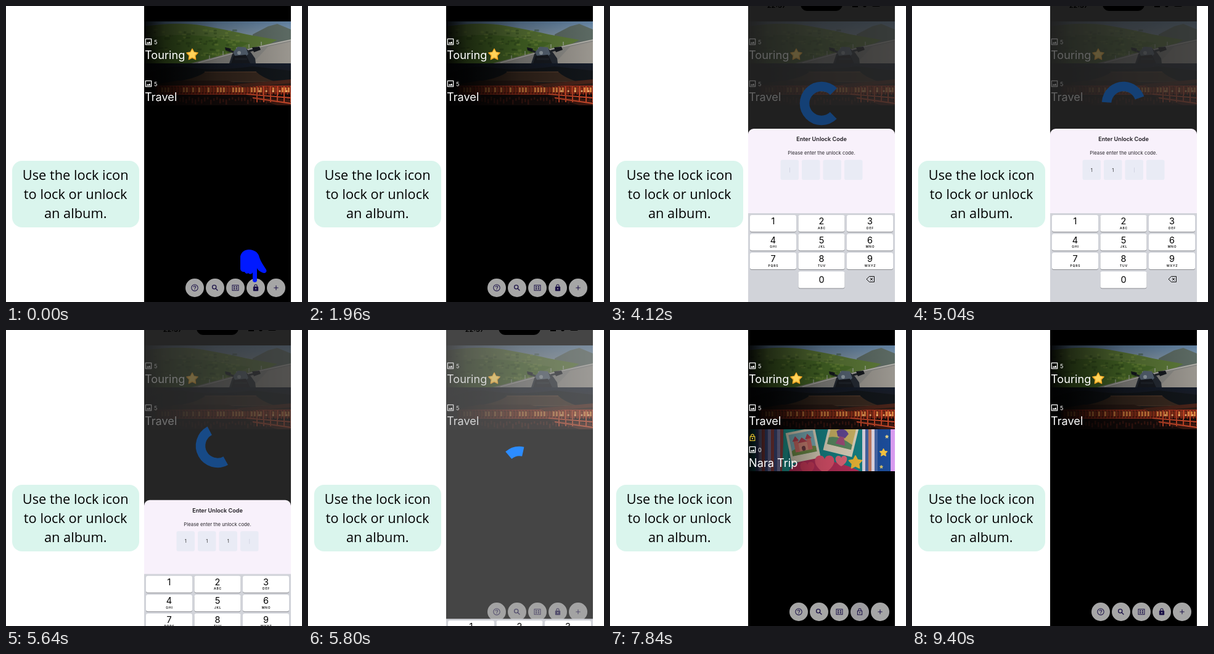
Animation of 480x480 px, one loop 9880 ms. Source, as an HTML page with a canvas:

```html
<!DOCTYPE html>
<html lang="en">
<head>
<meta charset="utf-8">
<title>Album lock</title>
<style>
html, body { margin: 0; width: 100%; height: 100%; overflow: hidden; background: #fff; }
canvas { display: block; width: 480px; height: 480px; }
</style>
</head>
<body>
<canvas id="stage" width="480" height="480"></canvas>
<script>
const ctx = document.getElementById('stage').getContext('2d');
const LOOP = 9880, STEP = 40;
const LEFT = 224, RIGHT = 462, MID = 343;
const KB_OPEN = 336, KB_SHUT = 495, SHEET = 137;
const INK = '#1b1147';

const clamp = v => Math.max(0, Math.min(1, v));
const part = (t, start, dur) => clamp((t - start) / dur);
const easeOut = p => 1 - (1 - p) * (1 - p);
const rad = deg => deg * Math.PI / 180;

function rect(x, y, w, h, color) {
  ctx.fillStyle = color;
  ctx.fillRect(x, y, w, h);
}

function round(x, y, w, h, r, color) {
  ctx.fillStyle = color;
  ctx.beginPath();
  ctx.roundRect(x, y, w, h, r);
  ctx.fill();
}

function disc(x, y, r, color) {
  ctx.fillStyle = color;
  ctx.beginPath();
  ctx.arc(x, y, r, 0, 7);
  ctx.fill();
}

function shape(d, color) {
  ctx.fillStyle = color;
  ctx.fill(new Path2D(d));
}

function line(d, color, width) {
  ctx.strokeStyle = color;
  ctx.lineWidth = width;
  ctx.stroke(new Path2D(d));
}

function text(s, x, y, font, color, align = 'left', gap = 0) {
  ctx.font = font;
  ctx.fillStyle = color;
  ctx.textAlign = align;
  ctx.letterSpacing = gap + 'px';
  ctx.fillText(s, x, y);
}

function at(x, y, scale, draw, turn = 0) {
  ctx.save();
  ctx.translate(x, y);
  ctx.rotate(turn);
  ctx.scale(scale, scale);
  draw();
  ctx.restore();
}

function star(x, y, r, color) {
  ctx.beginPath();
  for (let i = 0; i < 10; i++) {
    const a = rad(i * 36 - 90), d = i % 2 ? r * 0.52 : r;
    ctx.lineTo(x + d * Math.cos(a), y + d * Math.sin(a));
  }
  ctx.closePath();
  ctx.lineJoin = 'round';
  ctx.lineWidth = r * 0.16;
  ctx.fillStyle = ctx.strokeStyle = color;
  ctx.fill();
  ctx.stroke();
  ctx.lineJoin = 'miter';
}

function heart(x, y, s, color) {
  at(x, y, s, () => shape('M0 10C-14 2-12-9-5-9Q-1-9 0-5Q1-9 5-9C12-9 14 2 0 10Z', color));
}

// Seeded random numbers in 0..1
function seeded(seed) {
  return () => (seed = seed * 16807 % 2147483647) / 2147483647;
}

// Icons, drawn around the origin on a 24 unit grid
const icons = {
  help() {
    line('M10 0A10 10 0 1 1-10 0A10 10 0 1 1 10 0M-3.2-2.2C-3-7 3.4-6.6 3.2-2.4C3-.3 0 0 0 3M0 4.8V7', INK, 2);
  },
  search() {
    line('M3.5-2.5A6 6 0 1 1-8.5-2.5A6 6 0 1 1 3.5-2.5M1.8 1.8L8.5 8.5', INK, 2.5);
  },
  album() {
    line('M-9.5-8H9.5V8H-9.5Z', INK, 2);
    for (const x of [-5.5, 1.5]) for (const y of [-5, 1]) rect(x, y, 4, 4, INK);
  },
  lock() {
    line('M-4-3V-6A4 4 0 0 1 4-6V-3', INK, 2.2);
    round(-8, -4, 16, 14, 2, INK);
    disc(0, 3, 2, '#a6a6a6');
  },
  unlock(color = INK) {
    line('M-4-3V-6A4 4 0 0 1 4-6V-3M-7-3H7V9H-7Z', color, 2);
    disc(0, 3, 2, color);
  },
  add() {
    line('M-7 0H7M0-7V7', INK, 2);
  },
  image() {
    line('M-8-8H8V8H-8Z', '#fff', 2.2);
    shape('M-6 5L-2.8.7L-.5 3.5L2.8-.8L6.5 5Z', '#fff');
  }
};

function tourPhoto() {
  const rnd = seeded(7);
  const sky = ctx.createLinearGradient(0, 25, 0, 62);
  sky.addColorStop(0, '#5f7f9f');
  sky.addColorStop(1, '#97a5ad');
  rect(LEFT, 25, 238, 68, sky);
  shape('M400 46L425 33L440 29L462 38V66H400Z', '#5c6a63');
  shape('M224 33Q280 25 320 32T390 46L440 55L400 76L330 93H224Z', '#5d7a38');
  shape('M224 52Q285 42 345 52L395 60L325 93H224Z', '#4c7029');
  ctx.globalAlpha = 0.4;
  for (let i = 0; i < 90; i++) {
    const x = 228 + rnd() * 145;
    round(x, 37 + rnd() * 44, 3 + rnd() * 6, 2 + rnd() * 2, 1, i % 2 ? '#2a4519' : '#84a044');
  }
  ctx.globalAlpha = 1;
  shape('M300 93L372 74L428 61L462 54V93Z', '#8b8a86');
  shape('M425 66L462 58V93H400Z', '#9a968f');
  line('M312 92L390 71L462 55', '#c9c8c0', 1.2);
  line('M330 86V80M352 80V73M374 74V67M394 68V62M414 64V58', '#bdc1bb', 1);
  // motorcycle
  shape('M362 93L367 78L374 70L388 68L397 75L404 85L405 93Z', '#252b34');
  shape('M368 75L376 66L389 67L393 78L385 85L372 82Z', '#596777');
  shape('M369 81L389 79L396 93H365Z', '#171a20');
  line('M358 70L369 75M394 73L411 69M371 86H391', '#20252c', 3);
  shape('M355 67L365 69L363 74L356 72ZM399 67L411 66L413 71L402 75Z', '#15191f');
  disc(378, 76, 3, '#9aa6ae');
}

function shrinePhoto() {
  const rnd = seeded(21);
  const sky = ctx.createLinearGradient(0, 93, 0, 120);
  sky.addColorStop(0, '#151d2b');
  sky.addColorStop(1, '#1d1a1c');
  rect(LEFT, 93, 238, 68, sky);
  shape('M224 112Q262 94 300 100T400 98L462 105V130H224Z', '#12161a');
  shape('M271 123Q309 118 323 107L405 106Q415 116 437 123Z', '#3a2a20');
  line('M322 107H406M275 123H436', '#5a4031', 1.2);
  shape('M238 128L278 121H360L372 125L462 121V131H238Z', '#2e1d17');
  rect(242, 129, 220, 14, '#55190f');
  rect(242, 143, 220, 18, '#150c0b');
  for (let x = 246; x < 462; x += 5) {
    rect(x + 1, 132, 3, 8, rnd() > 0.6 ? '#d9823f' : '#7e2f18');
    rect(x, 129, 1, 15, '#b53a20');
    rect(x, 147 + rnd() * 5, 2.5, 3 + rnd() * 6, '#3d1812');
  }
  line('M242 130H462M242 143H400', '#a8351f', 1.5);
  shape('M374 127L462 119V125L384 132Z', '#4a241a');
  shape('M392 146L462 152V161H440Z', '#3b1811');
  line('M390 143L462 149M400 149L462 158', '#c9492b', 2);
  for (let x = 406; x < 462; x += 11) rect(x, 130, 2, 26, '#c04426');
  for (let x = 411; x < 462; x += 11) disc(x, 138, 1.5, '#f3b878');
}

function polaroid(x, y, turn, back, draw) {
  at(x, y, 1, () => {
    rect(-24, -24, 48, 50, '#e9dfc7');
    rect(-20, -20, 40, 35, back);
    draw();
  }, turn);
}

function artPhoto() {
  rect(LEFT, 161, 238, 68, '#17878a');
  for (let i = 0; i < 9; i++) rect(236 + i * 5, 161, 5, 68, ['#4b5a97', '#8d8bbb', '#a34a4a'][i % 3]);
  shape('M282 161H300Q282 194 291 229H279Z', '#20a299');
  shape('M290 229Q308 203 345 210T405 229Z', '#bf315d');
  polaroid(313, 186, -0.2, '#83b8c2', () => {
    shape('M-20 15V7Q-6 0 20 6V15Z', '#75954b');
    rect(-11, -5, 22, 15, '#e0907f');
    rect(-14, -9, 7, 19, '#d9706a');
    rect(7, -9, 7, 19, '#d9706a');
    shape('M-16-8L-10-16L-5-8ZM5-8L10-16L16-8ZM-8-4L0-12L8-4Z', '#c24556');
    round(-3, 2, 6, 8, 3, '#754047');
  });
  polaroid(375, 175, 0.24, '#d6bd6a', () => {
    shape('M-20 15V4Q-5-4 20 7V15Z', '#5f9267');
    shape('M-10-9Q0-20 10-9L6-1H-6Z', '#694b9c');
    shape('M-7 11L-3-2H4L9 11Z', '#aa5182');
  });
  heart(348, 217, 1.5, '#ea5672');
  heart(320, 224, 1.1, '#d83e60');
  heart(375, 212, 0.9, '#ef6c80');
  star(398, 215, 11, '#f4be38');
  for (let i = 0; i < 5; i++) rect(409 + i * 5, 161, 5, 68, ['#e4dcea', '#4667a8', '#c77f66'][i % 3]);
  rect(434, 161, 22, 68, '#1c4d9b');
  star(443.5, 199, 6.5, '#f6c642');
  star(449, 173, 3, '#e8d88a');
  star(440, 222, 3, '#d8c56c');
  rect(455, 161, 7, 68, '#d99cf0');
}

function row(y, title, count, photo, shade) {
  ctx.save();
  ctx.beginPath();
  ctx.rect(LEFT, y, 238, 68);
  ctx.clip();
  photo();
  const fade = ctx.createLinearGradient(LEFT, 0, RIGHT, 0);
  fade.addColorStop(0, 'rgba(0,0,0,0.95)');
  fade.addColorStop(0.14, `rgba(0,0,0,${shade})`);
  fade.addColorStop(0.5, `rgba(0,0,0,${shade * 0.4})`);
  fade.addColorStop(1, 'rgba(0,0,0,0)');
  rect(LEFT, y, 238, 68, fade);
  ctx.restore();
  at(231, y + 33, 0.58, icons.image);
  text(count, 240, y + 36.5, '9.2px Inter, sans-serif', '#fff');
  text(title, 225, y + 60.5, '18.2px Inter, sans-serif', '#fff');
}

function button(x, icon, press = 0) {
  disc(x, 457, 15, '#a6a6a6');
  if (press) disc(x, 457, 15, `rgba(40,30,80,${0.15 * press})`);
  at(x, 457, 0.52, icon);
}

function album(t) {
  rect(LEFT, 0, 238, 480, '#000');
  row(25, 'Touring', '5', tourPhoto, 0.65);
  star(302, 79, 9.5, '#f5a623');
  star(302, 78.5, 7, '#ffd45a');
  row(93, 'Travel', '5', shrinePhoto, 0.85);
  const open = t >= 6160 && t < 7960;
  if (open) {
    row(161, 'Nara Trip', '0', artPhoto, 0.55);
    at(231, 174.5, 0.55, () => icons.unlock('#f3cd32'));
  }
  button(306, icons.help);
  button(339, icons.search);
  button(372, icons.album);
  button(405, open ? () => icons.unlock() : icons.lock, Math.sin(Math.PI * part(t, 7760, 480)));
  button(438, icons.add);
}

// cubic-bezier(.4, 0, .2, 1)
function fastOutSlowIn(x) {
  let lo = 0, hi = 1, s = 0.5;
  for (let i = 0; i < 18; i++) {
    s = (lo + hi) / 2;
    const q = 1 - s;
    if (1.2 * q * q * s + 0.6 * q * s * s + s * s * s < x) lo = s; else hi = s;
  }
  return 3 * (1 - s) * s * s + s * s * s;
}

function spinner(t, y) {
  const e = Math.max(0, t - 3450), p = e % 1333 / 1333;
  const head = 270 * fastOutSlowIn(clamp(p * 2));
  const tail = 270 * fastOutSlowIn(clamp(p * 2 - 1));
  const drift = (t - 3600) * 0.0185 - 28;
  const start = -90 + tail + e / 2222 * 360 + p * 90 + drift;
  ctx.strokeStyle = '#2c8cff';
  ctx.lineWidth = 15.5;
  ctx.beginPath();
  ctx.arc(MID, y, 27.5, rad(start), rad(start + Math.max(0.5, head - tail)));
  ctx.stroke();
}

function statusBar() {
  text('22:37', 270, 3, '600 11px Inter, sans-serif', '#000', 'center');
  round(309, -14, 68, 22, 11, '#000');
  rect(393, -4, 9, 6, '#000');
  disc(413, -1, 3, '#000');
  round(425, -6, 13, 7, 2, '#000');
}

function sheet(y, t) {
  round(LEFT, y, 238, 500, [9, 9, 0, 0], '#f8f1fb');
  text('Enter Unlock Code', MID, y + 20, '600 9.1px Inter, sans-serif', '#1d1a20', 'center');
  text('Please enter the unlock code.', MID, y + 42, '7.8px Inter, sans-serif', '#2b282e', 'center');
  const typed = [4680, 4920, 5160].filter(k => t >= k).length;
  for (let i = 0; i < 4; i++) {
    const x = 276.5 + i * 34.5;
    round(x, y + 50.5, 29.5, 32.5, 3, '#e9ebf5');
    if (i < typed) text('1', x + 14.8, y + 69.5, '7.5px Inter, sans-serif', '#333', 'center');
    else if (i === typed && t > 3800) rect(x + 14.5, y + 63, 0.7, 8, '#c9cbdc');
  }
}

function keyboard(y) {
  rect(LEFT, y, 238, 200, '#d1d3d9');
  const letters = ['', 'ABC', 'DEF', 'GHI', 'JKL', 'MNO', 'PQRS', 'TUV', 'WXYZ'];
  const key = (col, line) => {
    const x = 227 + col * 78.5, top = y + 3 + line * 30.5;
    round(x, top + 1, 75, 27, 3, '#8a8c91');
    round(x, top, 75, 27, 3, '#fff');
    return [x + 37.5, top];
  };
  const digit = '14.5px Inter, sans-serif';
  letters.forEach((s, i) => {
    const [x, top] = key(i % 3, Math.floor(i / 3));
    text(i + 1, x, top + 15, digit, '#000', 'center');
    text(s, x + 0.5, top + 22.5, '600 5px Inter, sans-serif', '#111', 'center', 0.8);
  });
  const [x, top] = key(1, 3);
  text('0', x, top + 18.5, digit, '#000', 'center');
  at(422.5, y + 107, 1, () =>
    line('M-6.5 0L-2-4.5H6V4.5H-2ZM-.5-2L3.5 2M3.5-2L-.5 2', '#111', 1));
}

function unlocking(t) {
  const up = easeOut(part(t, 3577, 420)) - easeOut(part(t, 5552, 420));
  const shown = easeOut(part(t, 3488, 280)) - Math.pow(part(t, 5590, 200), 1.5);
  const kb = KB_SHUT + (KB_OPEN - KB_SHUT) * up;
  rect(LEFT, 0, 238, 480, 'rgba(158,158,158,0.435)');
  spinner(t, (kb - 20) / 2);
  rect(LEFT, 0, 238, 480, `rgba(0,0,0,${0.54 * shown})`);
  statusBar();
  if (shown > 0) sheet(kb - SHEET * shown, t);
  if (up > 0.12) keyboard(kb);
}

function hand(t) {
  const p = part(t, 480, 960);
  const scale = 1 + 0.19 * (1 - Math.cos(2 * Math.PI * p)) / 2;
  at(401.5, 421.5, scale, () => {
    ctx.translate(-401.5, -421.5);
    shape('M380 406C382 396 392 393 400 396C407 398 410 403 411 408C413 414 417 420 421 426' +
      'C425 431 420 435 415 432C411 430 408 428 407 425L407 445C407 449 400 449 400 445' +
      'L400 432C398 436 394 435 393 433C391 435 388 434 387 431C383 432 380 429 380 426Z', '#0019ff');
  });
}

function caption() {
  round(10, 251, 206, 108, 16, '#daf5ed');
  ['Use the lock icon', 'to lock or unlock', 'an album.'].forEach((s, i) =>
    text(s, 112.7, 281.5 + i * 31, '21.8px "Open Sans", "Noto Sans", sans-serif', '#000', 'center'));
}

function draw(t) {
  rect(0, 0, 480, 480, '#fff');
  caption();
  ctx.save();
  ctx.beginPath();
  ctx.rect(LEFT, 0, RIGHT - LEFT, 480);
  ctx.clip();
  album(t);
  if (t >= 3400 && t < 6160) unlocking(t);
  if (t < 1960) hand(t);
  ctx.restore();
}

const begin = performance.now();
function tick() {
  const t = (performance.now() - begin) % LOOP;
  draw(Math.floor(t / STEP) * STEP);
  requestAnimationFrame(tick);
}
tick();
</script>
</body>
</html>
```
